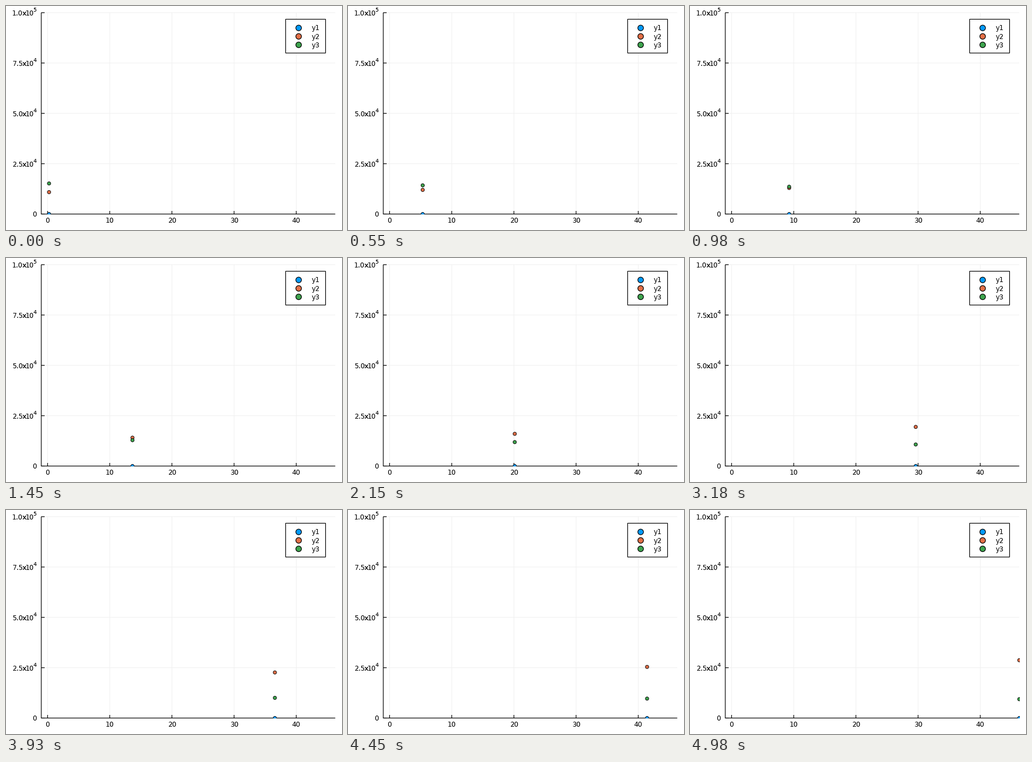
Animation of 600x400 px, one loop 5010 ms. Source, as a matplotlib script:

```python
import numpy as np
import matplotlib.pyplot as plt
from matplotlib.animation import FuncAnimation
from matplotlib.patches import Circle, Rectangle

W, H, DPI = 600, 400, 100
PT = 72 / DPI  # points per pixel
LEFT, RIGHT, TOP, BOTTOM = 63, 588, 11.9, 371.5
X0, UNIT = 74.3, 11.1
STEPS, TICK, LOOP = 200, 10, 5010
COLORS = ["#009AFA", "#E36F47", "#3EA44E"]

plt.rcParams["font.family"] = "DejaVu Sans"
plt.rcParams["text.hinting"] = "native"
plt.rcParams["path.snap"] = False
fig = plt.figure(figsize=(W / DPI, H / DPI), dpi=DPI, facecolor="white")
ax = fig.add_axes([0, 0, 1, 1])
ax.set_xlim(0, W)
ax.set_ylim(H, 0)
ax.axis("off")


def line(x1, y1, x2, y2, color="black", width=1.2, z=2):
    ax.plot([x1, x2], [y1, y2], color=color, lw=width * PT, zorder=z,
            solid_capstyle="butt")


def label(x, y, text, size=12, ha="left"):
    ax.text(x, y, text, fontsize=size * PT, ha=ha, va="baseline")


def dot(x, y, radius, color, width, z):
    return ax.add_patch(Circle((x, y), radius, fc=color, ec="black",
                               lw=width * PT, zorder=z))


def power_label(y, mantissa, exponent):
    label(11.2, y + 5.4, mantissa)
    label(32.4, y + 5.4, "×", ha="center")
    label(35, y + 5.4, "10")
    label(48.6, y - 1.6, exponent, size=9.6)


# Grid, ticks and tick labels
for value in range(0, 50, 10):
    x = X0 + UNIT * value
    line(x, TOP, x, BOTTOM, "#f0f0f0", 1, 1)
    line(x, BOTTOM, x, BOTTOM - 5.5)
    label(x, 387, str(value), ha="center")

for i, mantissa in enumerate(["0", "2.5", "5.0", "7.5", "1.0"]):
    y = BOTTOM - (BOTTOM - TOP) * i / 4
    line(LEFT, y, RIGHT, y, "#f0f0f0", 1, 1)
    line(LEFT, y, LEFT + 6, y)
    if i:
        power_label(y, mantissa, "5" if i == 4 else "4")
    else:
        label(54.8, y + 4.4, mantissa, ha="right")

line(LEFT, TOP, LEFT, BOTTOM + 0.5)
line(LEFT, BOTTOM, RIGHT, BOTTOM)

# Legend
ax.add_patch(Rectangle((499.4, 23.6), 71.2, 60.4, fc="white", ec="black",
                       lw=1.2 * PT, zorder=3))
for i, color in enumerate(COLORS):
    y = 39.2 + 15.1 * i
    dot(522.6, y, 5, color, 1.2, 4)
    label(545.6, y + 4.2, f"y{i + 1}")

# Smooth curves of height above the axis, in pixels, through a few points
KNOTS = np.array([0, 22, 58, 86, 127, 157, 199]) / STEPS
RISING = np.polyfit(KNOTS, np.log([39.1, 43.2, 50.6, 57.5, 70, 81.3, 103.3]), 4)
FALLING = np.polyfit(KNOTS, [54.7, 51.1, 46.2, 42.8, 38.5, 36, 33.7], 3)

dots = [dot(0, 0, 3, c, 0.9, 5 + i) for i, c in enumerate(COLORS)]
window = Rectangle((LEFT, TOP), 589 - LEFT, 372 - TOP, transform=ax.transData)
for d in dots:
    d.set_clip_path(window)


def update(frame):
    # Steps last 30 and 20 ms in turn
    pair, rest = divmod(frame * TICK, 50)
    step = min(2 * pair + (rest >= 30), STEPS - 1)
    s = step / STEPS
    x = X0 + (RIGHT - X0) * (step + 1) / STEPS
    heights = [0, np.exp(np.polyval(RISING, s)), np.polyval(FALLING, s)]
    for d, h in zip(dots, heights):
        d.center = (x, BOTTOM - h)
    return dots


anim = FuncAnimation(fig, update, frames=LOOP // TICK, interval=TICK,
                     repeat=True, repeat_delay=0)
plt.show()
```
